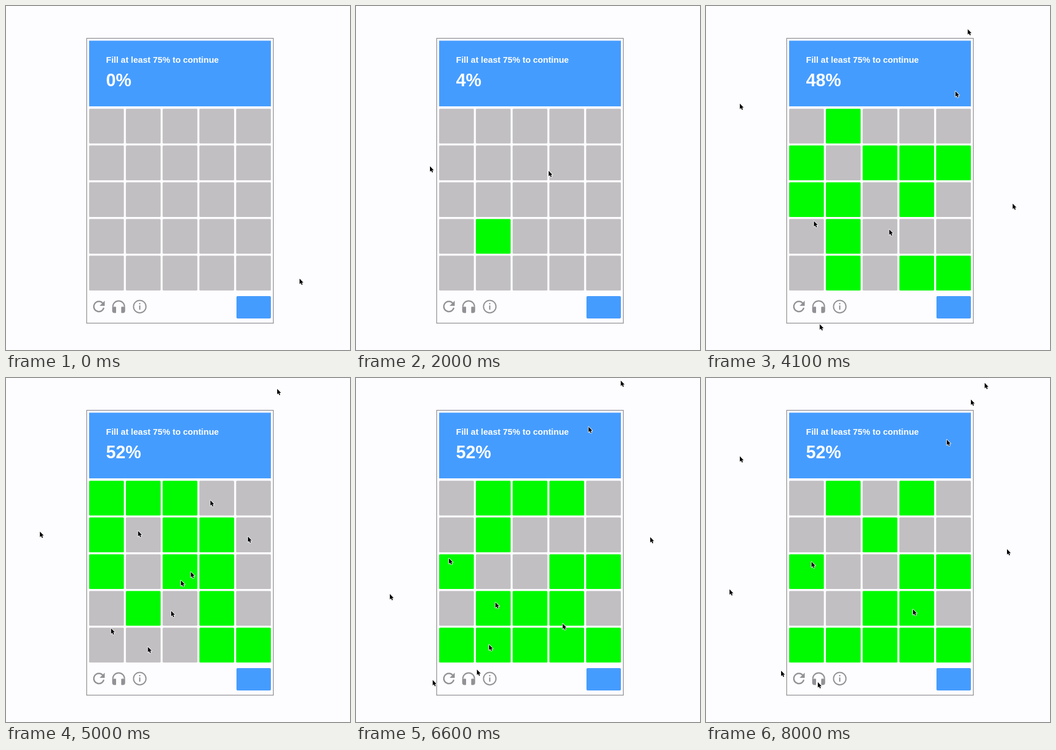
Write an HTML page with a canvas that moves like this. It is 600x600 px and loops after 8100 ms.

```html
<!DOCTYPE html>
<html lang="en">
<head>
<meta charset="utf-8">
<title>Fill the grid</title>
<style>
  html, body { margin: 0; width: 100%; height: 100%; overflow: hidden; background: #fdfcff; }
  canvas { display: block; width: 600px; height: 600px; }
</style>
</head>
<body>
<canvas id="stage" width="600" height="600"></canvas>
<script>
const ctx = document.getElementById('stage').getContext('2d');
const LOOP = 8100, STEP = 100, LAST = 8000;
const BLUE = '#459cff', GREY = '#c1bfc2', GREEN = '#00fa00', ICON = '#929195', PAPER = '#fdfcff';
const GRID = { x: 145, y: 179.2, pitch: 64.1, size: 60.6 };

// Cells (row, column) toggled in even steps over each span of time.
const BURSTS = [
  { from: 1000, span: 0, cells: '31' },
  { from: 2000, span: 1100, cells: '12 10 21 20 01' },
  { from: 3100, span: 1000, cells: '13 41 23 44 14 43' },
  { from: 4100, span: 1600, cells: '02 00 21 33 22 14 41 03 11 40 31 32 13' },
  { from: 5700, span: 900, cells: '12 00 42 22 24 10' },
  { from: 6600, span: 0, cells: '31 41' },
  { from: 6600, span: 1400, cells: '02 11 31 12' }
];

// Pointers split off in groups; each ends the loop at its own place.
const BIRTHS = [0, 1000, 2000, 2000, 2000, 3100, 3100, 4100, 4100, 4100];
const HOMES = [[463, 38], [60, 137], [132, 511], [362, 404], [185, 321],
  [421, 108], [526, 299], [487, 9], [42, 369], [196, 531]];
const OPENING = [[337, 288], [130, 280]];

const random = (seed => () => (seed = seed * 16807 % 2147483647) / 2147483647)(75);

const clicks = BURSTS.flatMap(({ from, span, cells }) => {
  const alive = BIRTHS.filter(b => b < from || b === 0).length;
  return cells.split(' ').map((cell, j, all) => ({
    t: from + span * (j + 1) / (all.length + 1), cell, hand: j % alive
  }));
});

const pointers = [];
BIRTHS.forEach((birth, i) => pointers.push(buildPointer(birth, i)));

function cellOrigin(row, col) {
  return [GRID.x + col * GRID.pitch, GRID.y + row * GRID.pitch];
}

function insideCell(cell) {
  const [x, y] = cellOrigin(+cell[0], +cell[1]);
  return { x: x + 20 + random() * 20, y: y + 20 + random() * 20 };
}

function buildPointer(birth, i) {
  const keys = clicks.filter(c => c.hand === i).map(c => ({ t: c.t, ...insideCell(c.cell) }));
  if (i === 0) keys.unshift({ t: 0, x: 513, y: 476 }, { ...keys[0], t: 600 });
  else keys.push({ t: birth, ...pointerAt(pointers[(i + 1) % 2], birth) });
  if (OPENING[i]) keys.push({ t: 2000, x: OPENING[i][0], y: OPENING[i][1] });

  // Between clicks it strays around its home, less and less.
  const [x, y] = HOMES[i];
  for (const t of [3100, 4100, 5700, 6600, LAST]) {
    if (t <= birth || keys.some(k => k.t === t)) continue;
    const reach = 300 * (1 - t / LAST);
    keys.push({
      t,
      x: Math.min(580, Math.max(60, x + (random() - 0.5) * reach)),
      y: Math.min(580, Math.max(5, y + (random() - 0.5) * reach))
    });
  }
  Object.assign(keys[keys.length - 1], { x, y });
  return keys.sort((a, b) => a.t - b.t);
}

function pointerAt(keys, t) {
  if (t < keys[0].t) return null;
  const i = keys.findIndex(k => k.t > t);
  if (i < 0) return keys[keys.length - 1];
  const a = keys[i - 1], b = keys[i];
  const u = (t - a.t) / (b.t - a.t), e = u * u * (3 - 2 * u);
  return { x: a.x + (b.x - a.x) * e, y: a.y + (b.y - a.y) * e };
}

function litCells(t) {
  const lit = new Set();
  for (const c of clicks) {
    if (c.t <= t && !lit.delete(c.cell)) lit.add(c.cell);
  }
  return lit;
}

function box(x, y, w, h, r, fill) {
  ctx.fillStyle = fill;
  ctx.beginPath();
  ctx.roundRect(x, y, w, h, r);
  ctx.fill();
}

function ring(x, y, r, width, from = 0, to = Math.PI * 2) {
  ctx.lineWidth = width;
  ctx.beginPath();
  ctx.arc(x, y, r, from, to);
  ctx.stroke();
}

function label(text, y, size) {
  ctx.font = `bold ${size}px "Liberation Sans", Arial, sans-serif`;
  ctx.fillStyle = '#fff';
  ctx.fillText(text, 174.5, y);
}

const ARROW = new Path2D('M0 0V10.2L2.3 8.1L4 11.8L5.7 11L4.1 7.4H7.2Z');
const RELOAD_TIP = new Path2D('M172.2 514V522.9H163.3Z');

function drawIcons() {
  ctx.strokeStyle = ctx.fillStyle = ICON;
  ring(162, 524.2, 8.9, 2.5, 0.25, Math.PI * 2 - 0.75);
  ctx.fill(RELOAD_TIP);

  ring(196.5, 524.5, 10.2, 2.2, Math.PI, 0);
  box(185.2, 524.5, 6.8, 11, [0, 1, 1, 4], ICON);
  box(201, 524.5, 6.8, 11, [1, 0, 4, 1], ICON);

  ring(233.3, 524.3, 10.9, 2);
  ctx.fillRect(232.2, 518, 2.2, 2.3);
  ctx.fillRect(232.2, 522.3, 2.2, 7.4);
}

function drawPointer({ x, y }) {
  ctx.save();
  ctx.translate(x - 1, y - 0.5);
  ctx.scale(0.93, 0.93);
  ctx.lineJoin = 'round';
  ctx.lineWidth = 1.8;
  ctx.strokeStyle = '#fff';
  ctx.stroke(ARROW);
  ctx.fillStyle = '#000';
  ctx.fill(ARROW);
  ctx.restore();
}

function draw(t) {
  ctx.fillStyle = PAPER;
  ctx.fillRect(0, 0, 600, 600);
  ctx.lineWidth = 1.2;
  ctx.strokeStyle = '#8a898d';
  ctx.strokeRect(140.7, 56.4, 325.6, 496.8);

  box(145, 60.5, 317, 114.5, 0, BLUE);
  label('Fill at least 75% to continue', 99, 15);
  // The counter trails the grid by one step.
  label(litCells(t - STEP).size * 4 + '%', 140, 30.5);

  const lit = litCells(t);
  for (let row = 0; row < 5; row++) {
    for (let col = 0; col < 5; col++) {
      const [x, y] = cellOrigin(row, col);
      box(x, y, GRID.size, GRID.size, 1.5, lit.has(`${row}${col}`) ? GREEN : GREY);
    }
  }

  drawIcons();
  box(402, 506, 60, 39, 2, BLUE);

  for (const keys of pointers) {
    const p = pointerAt(keys, t);
    if (p) drawPointer(p);
  }
}

const origin = performance.now();
function tick() {
  const t = (performance.now() - origin + 5) % LOOP;
  draw(Math.floor(t / STEP) * STEP);
  requestAnimationFrame(tick);
}
tick();
</script>
</body>
</html>
```
